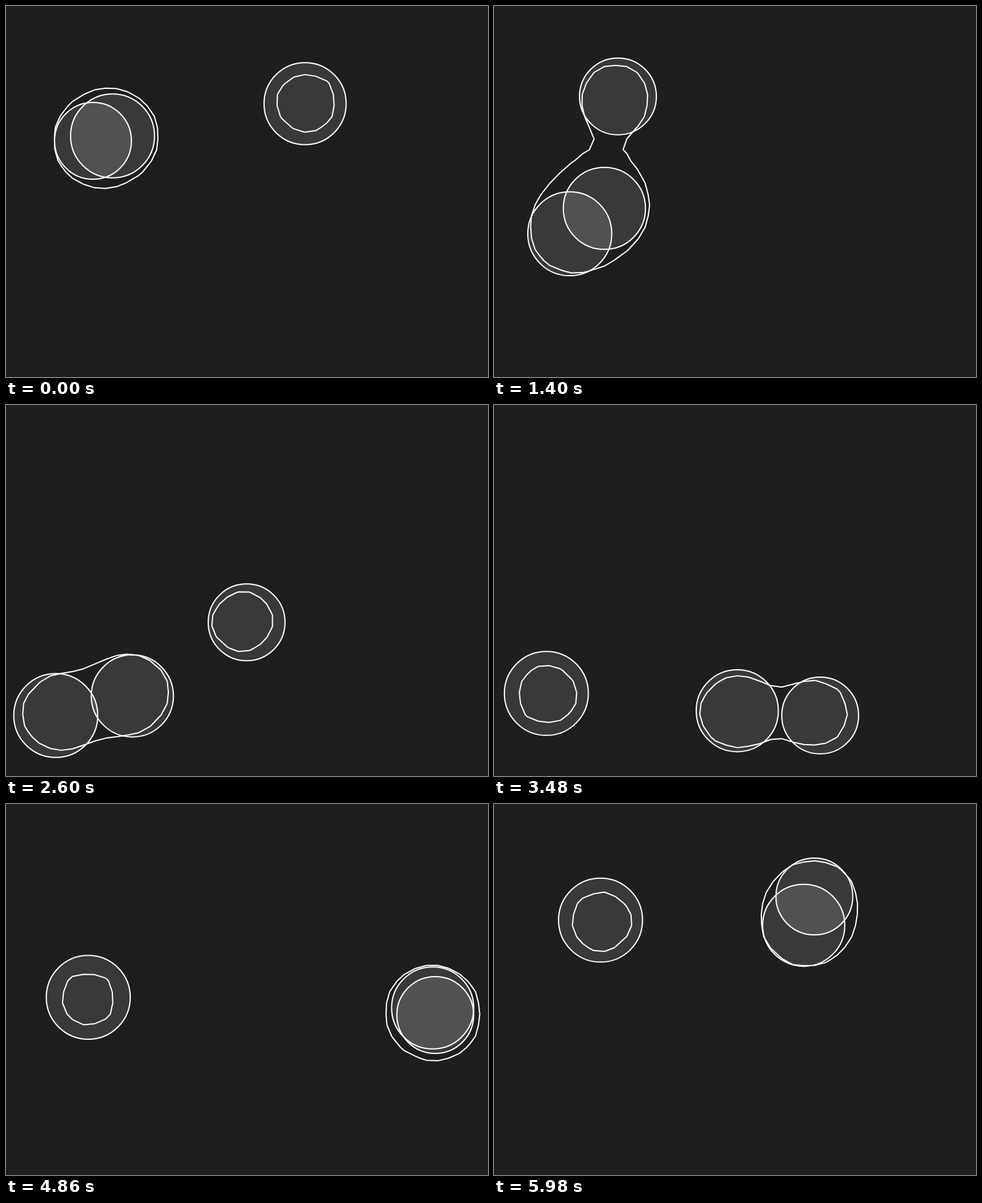
These frames come from a looping animation (784x604 px, 6000 ms). An HTML page with a canvas:

```html
<!DOCTYPE html>
<html lang="en">
<head>
<meta charset="utf-8">
<title>Metaballs</title>
<style>
  html, body { margin: 0; width: 100%; height: 100%; overflow: hidden; background: #1e1e1e; }
  canvas { display: block; }
</style>
</head>
<body>
<canvas id="stage" width="784" height="604"></canvas>
<script>
const ctx = document.getElementById('stage').getContext('2d');
const W = 784, H = 604, CELL = 18;
const COLS = Math.ceil(W / CELL), ROWS = Math.ceil(H / CELL);
const LEVEL = 1.8, CAP = 2;
const FRAME_MS = 20, FRAMES = 300;

// Per axis: start, speed per step, steps at which the ball bounces.
const balls = [
  { r: 68.3, x: [173.3, -0.705, [150]],     y: [211.5, 2.244, [145]] },
  { r: 66.8, x: [486.5, -4.323, [98, 250]], y: [159, 2.402, [158]] },
  { r: 62.5, x: [141.5, -3.163, [26, 236]], y: [219.5, -3.445, [46, 186]] }
];

function along([start, speed, turns], step) {
  let travel = step, sign = -2;
  for (const turn of turns) {
    travel += sign * Math.max(0, step - turn);
    sign = -sign;
  }
  return start + speed * travel;
}

const place = step => balls.map(b => ({ r: b.r, x: along(b.x, step), y: along(b.y, step) }));

function sampleField(circles) {
  const field = [];
  for (let j = 0; j <= ROWS; j++) {
    field.push([]);
    for (let i = 0; i <= COLS; i++) {
      let sum = 0;
      for (const c of circles) sum += c.r / Math.hypot(i * CELL - c.x, j * CELL - c.y);
      field[j].push(Math.min(sum, CAP));
    }
  }
  return field;
}

function traceContour(field) {
  ctx.beginPath();
  for (let j = 0; j < ROWS; j++) {
    for (let i = 0; i < COLS; i++) {
      const corners = [[i, j], [i + 1, j], [i + 1, j + 1], [i, j + 1]];
      const hits = [];
      corners.forEach(([ax, ay], k) => {
        const [bx, by] = corners[(k + 1) % 4];
        const a = field[ay][ax], b = field[by][bx];
        if ((a >= LEVEL) === (b >= LEVEL)) return;
        const f = (LEVEL - a) / (b - a);
        hits.push([(ax + (bx - ax) * f) * CELL, (ay + (by - ay) * f) * CELL]);
      });
      for (let k = 0; k < hits.length; k += 2) {
        ctx.moveTo(...hits[k]);
        ctx.lineTo(...hits[k + 1]);
      }
    }
  }
  ctx.stroke();
}

function drawCircle(c) {
  ctx.beginPath();
  ctx.arc(c.x, c.y, c.r, 0, Math.PI * 2);
  ctx.fill();
  ctx.stroke();
}

function draw(frame) {
  const step = frame ? frame + 1 : 0;
  ctx.fillStyle = '#1e1e1e';
  ctx.fillRect(0, 0, W, H);
  ctx.fillStyle = 'rgba(255, 255, 255, 0.12)';
  ctx.strokeStyle = '#fff';
  ctx.lineWidth = 2;
  place(step).forEach(drawCircle);
  // The outline trails the balls by one step.
  traceContour(sampleField(place(step - 1)));
}

const begin = performance.now();
function tick() {
  draw(Math.floor((performance.now() - begin) / FRAME_MS) % FRAMES);
  requestAnimationFrame(tick);
}
tick();
</script>
</body>
</html>
```
